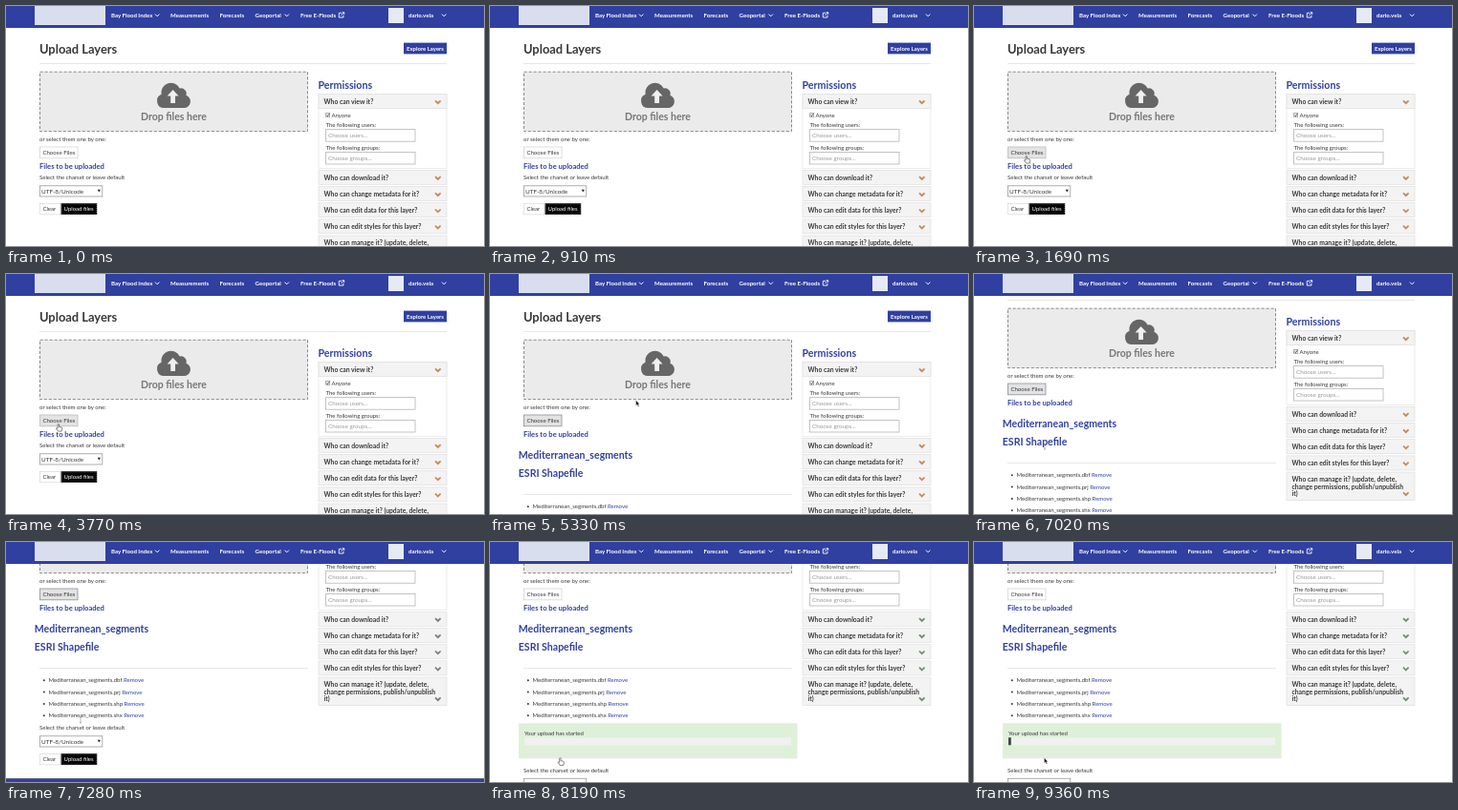
An HTML page for the animation above (9880 ms loop, 500x252 px).

```html
<!DOCTYPE html>
<html lang="en">
<head>
<meta charset="utf-8">
<title>Upload Layers</title>
<style>
  html, body { margin: 0; width: 100%; height: 100%; overflow: hidden; background: #fff; }
  svg { display: block; width: 100vw; height: 100vh; font-family: Lato, "Open Sans", sans-serif; }
</style>
</head>
<body>
<svg id="stage" viewBox="0 0 500 252"></svg>
<script>
const LOOP = 9880, TICK = 130;
const BLUE = '#3040a0', INK = '#383838';

const text = (x, y, s, { size = 6, fill = INK, bold = false, anchor = 'start' } = {}) =>
  `<text x="${x}" y="${y}" font-size="${size}" fill="${fill}" font-weight="${bold ? 700 : 400}" text-anchor="${anchor}">${s}</text>`;
const rect = (x, y, w, h, fill, extra = '') =>
  `<rect x="${x}" y="${y}" width="${w}" height="${h}" fill="${fill}" ${extra}/>`;
const path = (d, fill, extra = '') => `<path d="${d}" fill="${fill}" ${extra}/>`;
const line = (x1, x2, y) => rect(x1, y, x2 - x1, 0.8, '#e2e2e2');
const group = (id, body) => `<g id="${id}">${body}</g>`;

const navText = (x, s) => text(x, 11.8, s, { size: 6.1, fill: '#fff', bold: true });
const navArrow = x => path(`M${x} 8.6l2.2 2.2 2.2-2.2`, 'none', 'stroke="#fff" stroke-width="1"');
const field = (y, hint) =>
  rect(334.5, y, 93.5, 12.6, '#fff', 'stroke="#b5b5b5" stroke-width=".8"') +
  text(337, y + 8.5, hint, { size: 6.3, fill: '#999' });

function header() {
  return rect(0, 0, 500, 23, BLUE) +
    rect(30, 0, 74, 20, '#d9deee') +
    navText(110, 'Bay Flood Index') + navArrow(156) +
    navText(172, 'Measurements') + navText(223.5, 'Forecasts') +
    navText(260.5, 'Geoportal') + navArrow(291.5) +
    navText(308, 'Free E-Floods') +
    path('M351 7.3h-2.7v4.7h4.6v-2.3M350.4 9.9l3-3M351.6 6.7h2.1v2.1', 'none', 'stroke="#fff" stroke-width=".9"') +
    rect(400, 2, 16, 16, '#e6eaf4') +
    navText(421, 'dario.vela') + navArrow(456);
}

function panelHead(y, lines) {
  const h = 15 + (lines.length - 1) * 7.2;
  return rect(327, y, 134, h, '#f3f3f3', 'stroke="#dedede" stroke-width=".7"') +
    lines.map((s, i) => text(332.5, y + 10.2 + i * 7.2, s, { size: 6.8, bold: true })).join('') +
    path(`M448.4 ${y + h - 7.6}l1.2-1.2 2.2 2.1 2.2-2.1 1.2 1.2-3.4 3.5z`, 'currentColor');
}

function permissions() {
  return text(326.5, 86.6, 'Permissions', { size: 10.7, bold: true, fill: BLUE }) +
    rect(327, 93, 134, 77.5, '#fff', 'stroke="#e4e4e4" stroke-width=".7"') +
    panelHead(92.5, ['Who can view it?']) +
    rect(334.7, 112.6, 4, 4, '#fff', 'stroke="#888" stroke-width=".7"') +
    path('M335.5 114.6l.9 1 1.6-2.2', 'none', 'stroke="#222" stroke-width=".9"') +
    text(340.5, 117, 'Anyone') +
    text(334.5, 127.4, 'The following users:') + field(129.6, 'Choose users...') +
    text(334.5, 151, 'The following groups:') + field(153.4, 'Choose groups...') +
    [['Who can download it?'],
     ['Who can change metadata for it?'],
     ['Who can edit data for this layer?'],
     ['Who can edit styles for this layer?'],
     ['Who can manage it? (update, delete,', 'change permissions, publish/unpublish', 'it)']]
      .map((lines, i) => panelHead(172.3 + i * 17.2, lines)).join('');
}

function dropZone() {
  return rect(35.5, 69.2, 280, 62.4, '#ebebeb', 'stroke="#8a8a8a" stroke-width="1" stroke-dasharray="3.2 1.8"') +
    path('M165.5 107a7.4 7.4 0 0 1-3-14.2a10.2 10.2 0 0 1 19.2-6.3a5.6 5.6 0 0 1 6.7 7.3a6.8 6.8 0 0 1-2.4 13.2z', '#666') +
    path('M174.6 88l6 6.5h-3.6v7.5h-4.8v-7.5h-3.6z', '#f0f0f0') +
    text(175.5, 120, 'Drop files here', { size: 10.5, bold: true, fill: '#777', anchor: 'middle' });
}

function fileList() {
  const big = { size: 10.55, bold: true, fill: BLUE };
  return text(29.8, 193.8, 'Mediterranean_segments', big) +
    text(29.8, 213.3, 'ESRI Shapefile', big) +
    line(35, 316, 231.2) +
    ['dbf', 'prj', 'shp', 'shx'].map((ext, i) => {
      const y = 246.4 + i * 12.3;
      return `<circle cx="39.8" cy="${y - 2.1}" r="1" fill="${INK}"/>` +
        text(44.6, y, `Mediterranean_segments.${ext} <tspan fill="${BLUE}">Remove</tspan>`);
    }).join('');
}

function progress() {
  return rect(30, 289.3, 291.5, 37, '#dff0d8') +
    text(36, 302, 'Your upload has started') +
    rect(36, 304.3, 279, 8, '#f0f1f0') +
    '<rect id="bar" x="36" y="304.3" height="8" fill="#3f4743"/>';
}

function uploadForm() {
  return text(35, 182, 'Select the charset or leave default') +
    rect(35.4, 188.8, 65.4, 11.2, '#fff', 'stroke="#999" stroke-width=".8"') +
    text(37, 196.8, 'UTF-8/Unicode', { size: 6.4 }) +
    path('M95.7 192.8h3.2l-1.6 2.8z', '#222') +
    rect(35.4, 207.4, 21.4, 11.4, '#fff', 'stroke="#ddd" stroke-width=".8"') +
    text(38.4, 215.2, 'Clear') +
    rect(57.6, 207.2, 37.6, 11.8, '#050505') +
    rect(58.4, 208, 36, 10.2, 'none', 'stroke="#777" stroke-width=".5" stroke-dasharray="1 1"') +
    text(60.6, 215.2, 'Upload files', { fill: '#fff' });
}

const pointers = {
  arrow: path('M0 0v5.6l1.3-1.1 1 2.1 1-.5-1-2h1.7z', '#111', 'stroke="#fff" stroke-width=".4"'),
  hand: path('M-.7 .6q.7-1 1.4 0v2.5l2.6.6q.9.4.7 1.5l-.6 2.6h-3.6l-2.2-3q.3-1 1.7 0z', '#fff', 'stroke="#333" stroke-width=".6"'),
  beam: path('M-1-3h2M0-3v6M-1 3h2', 'none', 'stroke="#888" stroke-width=".6"')
};

const stage = document.getElementById('stage');
stage.innerHTML = rect(0, 0, 500, 252, '#fff') +
  group('page',
    text(35, 50.2, 'Upload Layers', { size: 12.9, bold: true }) +
    rect(416, 38.6, 45, 11.8, BLUE) +
    text(438.5, 46.7, 'Explore Layers', { size: 6, fill: '#fff', bold: true, anchor: 'middle' }) +
    line(35, 461, 60) +
    dropZone() +
    text(35, 142, 'or select them one by one:') +
    '<rect id="choose" x="35.4" y="148" width="39.6" height="11.8" stroke-width=".8"/>' +
    text(38.4, 156, 'Choose Files', { size: 6.1 }) +
    text(35, 170.8, 'Files to be uploaded', { size: 7.6, bold: true, fill: BLUE }) +
    group('files', fileList()) + group('progress', progress()) +
    group('form', uploadForm()) + permissions() +
    group('footer', rect(0, 347.4, 500, 60, BLUE) + rect(0, 347.4, 500, 0.8, '#4a4f66'))) +
  header() +
  group('cursor', Object.entries(pointers).map(([id, shape]) => group(id, shape)).join(''));

const el = id => document.getElementById(id);
const show = (id, on) => el(id).setAttribute('display', on ? 'inline' : 'none');
const move = (id, x, y) => el(id).setAttribute('transform', `translate(${x} ${y})`);
const ramp = (t, a, b) => Math.min(1, Math.max(0, (t - a) / (b - a)));

// Cursor stops: time, x, y
const route = [
  [1430, 84, 176], [1690, 54.8, 157.3], [5200, 54.8, 157.3], [5330, 152.6, 132.6],
  [5720, 140, 140], [5850, 140, 140], [6500, 64, 163.2], [6890, 72, 178],
  [7280, 78, 187], [7930, 73.4, 226.6], [LOOP, 73.4, 226.6]
];

function cursorAt(t) {
  const i = Math.max(1, route.findIndex(p => p[0] >= t));
  const [a, b] = [route[i - 1], route[i]];
  const k = ramp(t, a[0], b[0]);
  return [a[1] + (b[1] - a[1]) * k, a[2] + (b[2] - a[2]) * k];
}

function pointerAt(t) {
  if (t < 1430) return '';
  if ((t >= 1690 && t < 5330) || (t >= 7800 && t < 8580)) return 'hand';
  return t >= 7020 && t < 7540 ? 'beam' : 'arrow';
}

function draw(time) {
  const t = Math.floor(time % LOOP / TICK) * TICK;
  const listed = t >= 5330, started = t >= 8190;
  const scroll = 99 * ramp(t, 6890, 7280);

  move('page', 0, -scroll);
  el('page').setAttribute('color', scroll < 50 ? '#c48a55' : started ? '#6f8f70' : '#7d7d7d');
  show('files', listed);
  show('progress', started);
  move('form', 0, started ? 158.5 : listed ? 114 : 0);
  move('footer', 0, started ? 44.5 : 0);
  el('bar').setAttribute('width', 2.8 * ramp(t, 8710, 9360));

  const active = t >= 1690 && !started;
  el('choose').setAttribute('fill', active ? '#e3e3e3' : '#fff');
  el('choose').setAttribute('stroke', listed && active ? '#8a8f9f' : active ? '#bbb' : '#d4d4d4');

  const kind = pointerAt(t);
  for (const id in pointers) show(id, id === kind);
  move('cursor', ...cursorAt(t));
}

const start = performance.now();
function loop() {
  draw(performance.now() - start);
  requestAnimationFrame(loop);
}
loop();
</script>
</body>
</html>
```
